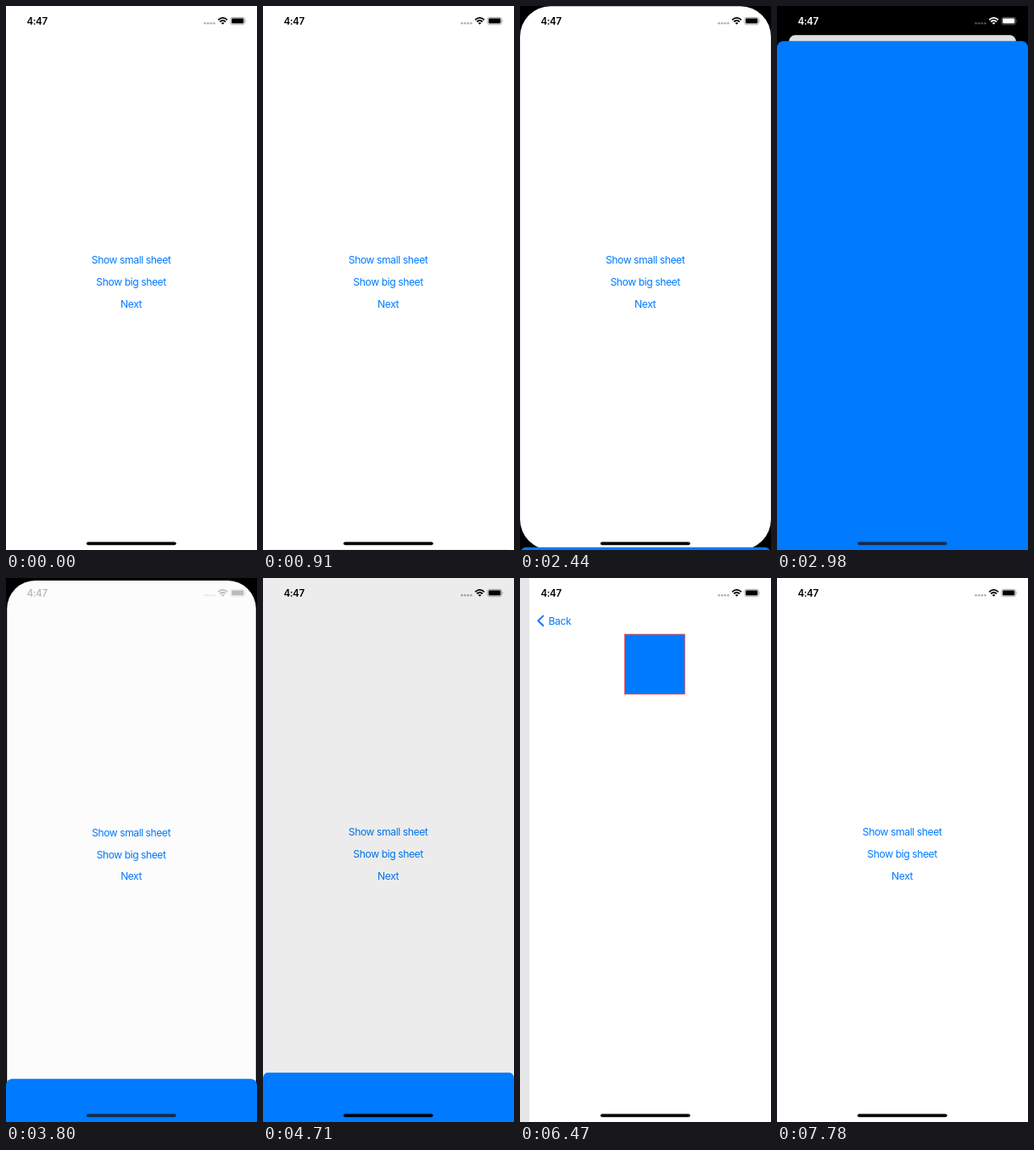
Write an HTML page that moves like this. It is 296x640 px and loops after 8 s.

```html
<!DOCTYPE html>
<html lang="en">
<head>
<meta charset="utf-8">
<title>Sheets and navigation</title>
<style>
  html, body { margin: 0; width: 100%; height: 100%; overflow: hidden; background: #000; }
  svg { display: block; width: 296px; height: 640px; }
  text { font: 12.15px Inter, Roboto, sans-serif; letter-spacing: -.42px; fill: #007aff; }
  .mid { text-anchor: middle; }
  #status text { font-size: 11.5px; font-weight: 600; letter-spacing: -.3px; fill: currentColor; }
</style>
</head>
<body>
<svg viewBox="0 0 296 640">
  <defs>
    <clipPath id="sheetShape">
      <path d="M0 7.5Q0 0 7.5 0H288.5Q296 0 296 7.5V62C296 84 284 95.8 262 95.8H34C12 95.8 0 84 0 62Z"/>
    </clipPath>
  </defs>
  <rect width="296" height="640"/>

  <g id="home">
    <rect class="card" width="296" height="640" fill="#fff"/>
    <text class="mid" x="147.6" y="303.3">Show small sheet</text>
    <text class="mid" x="147.6" y="329.3">Show big sheet</text>
    <text class="mid" x="147.6" y="355.3">Next</text>
    <rect class="card" id="dim" width="296" height="640"/>
  </g>

  <g id="page">
    <rect width="296" height="640" fill="#fff"/>
    <path d="M16.4 44.6L10.4 50.3L16.4 56" fill="none" stroke="#007aff" stroke-width="1.9" stroke-linecap="round" stroke-linejoin="round"/>
    <text x="22.6" y="54.5">Back</text>
    <rect x="112.5" y="66.2" width="70.8" height="70.4" fill="#007aff" stroke="#e2474f" stroke-width=".9"/>
  </g>

  <g id="small">
    <g clip-path="url(#sheetShape)">
      <rect width="296" height="96" fill="#fff"/>
      <rect width="296" height="71.5" fill="#007aff"/>
    </g>
  </g>

  <rect id="big" width="296" height="660" rx="7.5" fill="#007aff"/>

  <g id="status" fill="currentColor">
    <text x="24.4" y="21.9">4:47</text>
    <g opacity=".3">
      <circle cx="234.6" cy="20.3" r="1.35"/>
      <circle cx="238.2" cy="20.3" r="1.35"/>
      <circle cx="241.8" cy="20.3" r="1.35"/>
      <circle cx="245.4" cy="20.3" r="1.35"/>
    </g>
    <g fill="none" stroke="currentColor" stroke-width="1.7">
      <path d="M250.2 16.3Q255.6 11.5 261 16.3"/>
      <path d="M252.2 18.5Q255.6 15.5 259 18.5"/>
    </g>
    <path d="M255.6 21.8L253.7 19.9Q255.6 18.4 257.5 19.9Z"/>
    <rect x="264.7" y="13.4" width="16.9" height="8.4" rx="2.5" fill="none" stroke="currentColor" stroke-width=".8" opacity=".4"/>
    <rect x="266" y="14.6" width="14.3" height="6" rx="1.4"/>
    <path d="M282.6 16.2Q284 17.6 282.6 19Z" opacity=".45"/>
  </g>
  <rect id="bar" x="95" y="630.5" width="105.6" height="3.7" rx="1.85"/>
</svg>

<script>
const LOOP = 8000, W = 296, H = 640;
const DIM = 0.125, LEAD = 6;
const SHEET_RATE = 0.0178, NAV_RATE = 0.0152;

// [first change, last change, number of steps]
const small1 = [[800, 1250, 5], [1660, 2090, 5]];
const small2 = [[4600, 5040, 5], [5430, 5870, 5]];
const bigSheet = [[2440, 2980, 6], [3570, 4130, 6]];
const push = [[6140, 6690, 6], [7210, 7780, 6]];

const $ = id => document.getElementById(id);
const [home, dim, page, small, big, status, bar] =
  ['home', 'dim', 'page', 'small', 'big', 'status', 'bar'].map($);
const cards = document.querySelectorAll('.card');

const clamp = v => Math.min(1, Math.max(0, v));
const mix = (a, b, k) => a + (b - a) * k;
const spring = x => 1 - (1 + x) * Math.exp(-x); // critically damped
const move = (el, x, y) => el.setAttribute('transform', `translate(${x} ${y})`);

// Progress 0..1 of one transition, advancing in evenly spaced steps
function progress(t, [from, to, steps], rate) {
  if (t < from) return 0;
  if (t >= to) return 1;
  const gap = (to - from) / (steps - 1);
  const elapsed = Math.floor((t - from) / gap + 1e-6) * gap;
  return spring((elapsed + LEAD) * rate);
}

const shown = (t, [open, close], rate) =>
  progress(t, open, rate) - progress(t, close, rate);

// Share of white in the status bar while it changes style
function statusTone(t) {
  const [[from, to], [back, end]] = bigSheet;
  if (t < from || t >= end) return 0;
  if (t < to) return clamp((Math.floor((t - from) / 108) * 108) / 350);
  const elapsed = Math.floor((t - back) / 112) * 112;
  return 1 - clamp((elapsed - 130) / 350);
}

function draw(t) {
  const s = shown(t, small1, SHEET_RATE) + shown(t, small2, SHEET_RATE);
  const b = shown(t, bigSheet, SHEET_RATE);
  const n = shown(t, push, NAV_RATE);

  const scale = mix(1, 0.904, b);
  const x = W * (1 - scale) / 2 - 0.3 * W * n;
  home.setAttribute('transform', `translate(${x} ${34.3 * b}) scale(${scale})`);
  const radius = b > 0 ? mix(36, 8, b) : 0;
  cards.forEach(c => c.setAttribute('rx', radius));
  dim.setAttribute('opacity', DIM * (s + b) + 0.1 * n);

  move(page, W * (1 - n), 0);
  move(small, 0, H - 95.8 * s);
  move(big, 0, mix(H, 41.2, b));

  const tone = Math.round(255 * statusTone(t));
  status.style.color = `rgb(${tone},${tone},${tone})`;
  bar.setAttribute('fill', b > 0.02 ? '#192b45' : '#000');
}

const start = performance.now();
function tick() {
  draw((performance.now() - start) % LOOP);
  requestAnimationFrame(tick);
}
tick();
</script>
</body>
</html>
```
